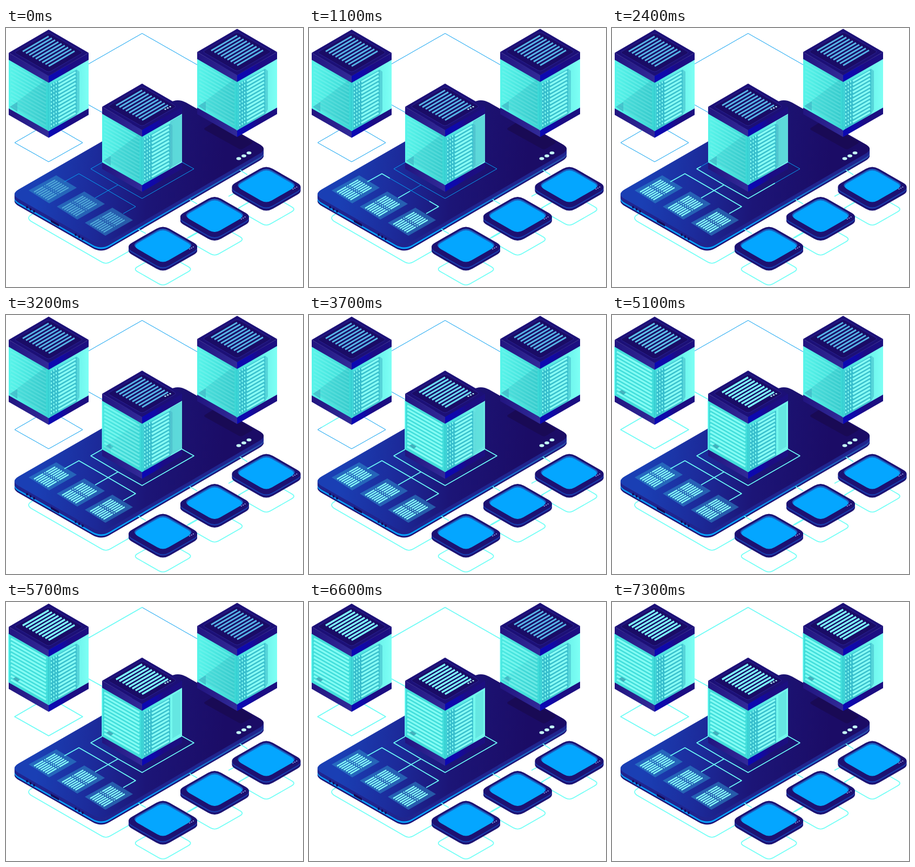
An HTML page for the animation above (9300 ms loop, 550 by 480 pixels).

```html
<!DOCTYPE html>
<html lang="en">
<head>
<meta charset="utf-8">
<title>Isometric servers</title>
<style>
  html, body { margin: 0; width: 100%; height: 100%; overflow: hidden; background: #fff; }
  svg { display: block; width: 550px; height: 480px; }
  .lit { opacity: 0; }
  .dim { fill: none; stroke: #069ff0; stroke-width: 1; }
  .wire { fill: none; stroke: #6ffff6; stroke-width: 1.6; stroke-linejoin: round; }
  .grow { stroke-dasharray: 1 2; stroke-dashoffset: 1; }
</style>
</head>
<body>
<svg id="stage" viewBox="0 0 550 480">
  <defs>
    <linearGradient id="deck" gradientUnits="userSpaceOnUse" x1="60" y1="270" x2="400" y2="300">
      <stop offset="0" stop-color="#1a3fb4"/><stop offset=".3" stop-color="#1c2b9b"/>
      <stop offset=".6" stop-color="#1c1577"/><stop offset="1" stop-color="#1b0c66"/>
    </linearGradient>
    <linearGradient id="edge" gradientUnits="userSpaceOnUse" x1="15" y1="0" x2="477" y2="0">
      <stop offset="0" stop-color="#079cf5"/><stop offset=".45" stop-color="#06a5ff"/>
      <stop offset="1" stop-color="#2a4da8"/>
    </linearGradient>
    <linearGradient id="capL"><stop offset="0" stop-color="#221580"/><stop offset="1" stop-color="#312a98"/></linearGradient>
    <linearGradient id="capR">
      <stop offset="0" stop-color="#0b08b4"/><stop offset=".3" stop-color="#1009a8"/>
      <stop offset=".55" stop-color="#1c0c84"/><stop offset="1" stop-color="#1c1080"/>
    </linearGradient>
    <linearGradient id="glassL"><stop offset="0" stop-color="#58f5ea"/><stop offset="1" stop-color="#3ad6d4"/></linearGradient>
    <linearGradient id="glassR"><stop offset="0" stop-color="#46dcdc"/><stop offset="1" stop-color="#7dfff4"/></linearGradient>
  </defs>
</svg>
<script>
const stage = document.getElementById('stage');
const out = [];
const add = s => out.push(s);
const poly = (pts, fill, extra = '') => add(`<polygon points="${pts}" fill="${fill}" ${extra}/>`);
const path = (d, extra) => add(`<path d="${d}" ${extra}/>`);
const range = (n, f) => Array.from({ length: n }, (_, i) => f(i));

// Closed polygon with corners rounded over r pixels
function round(pts, r) {
  const toward = (p, q) => {
    const k = r / Math.hypot(q[0] - p[0], q[1] - p[1]);
    return [p[0] + (q[0] - p[0]) * k, p[1] + (q[1] - p[1]) * k];
  };
  return pts.map((p, i) => {
    const a = pts[(i + pts.length - 1) % pts.length], b = pts[(i + 1) % pts.length];
    return `${i ? 'L' : 'M'}${toward(p, a)} Q${p} ${toward(p, b)}`;
  }).join(' ') + 'Z';
}
const diamond = (x, y, w, h = w * .577) => [[x - w, y], [x, y - h], [x + w, y], [x, y + h]];

// Stack of shifted copies that forms a slab's side
function slab(d, depth, color) {
  for (let k = depth; k > 0; k--) path(d, `transform="translate(0 ${k})" fill="${color(k)}"`);
}

// Dim wire plus a bright one that grows between two times
const grow = (d, from, to) => {
  path(d, 'class="dim"');
  path(d, `class="wire grow" pathLength="1" data-t="${from},${to}"`);
};
const fade = (from, to) => `class="lit" data-t="${from},${to}"`;

function phone() {
  const d = round([[8, 308], [318, 129.5], [485, 224], [176, 404]], 18);
  slab(d, 13, k => k > 10 ? '#1d1478' : k > 7 ? 'url(#edge)' : '#20258f');
  path(d, 'fill="url(#deck)"');
  path(round([[365, 187], [388, 173], [459, 212], [435, 226]], 5), 'fill="#190a55"');
  [[431, 242], [440.5, 237], [450, 231.5]].forEach(([x, y]) =>
    add(`<ellipse cx="${x}" cy="${y}" rx="4.4" ry="2.7" fill="#c5fff6"/>`));
  poly('83,355 98,363.5 98,368 83,359.5', '#150a58');
  for (const [x, y] of [[39, 332], [129, 383]])
    for (let i = 0; i < 3; i++)
      add(`<ellipse cx="${x + i * 6.5}" cy="${y + i * 3.8}" rx="1.8" ry="2.6" fill="#150a58"/>`);
}

function chip(i) {
  const rows = range(7, k => {
    const x = 52 + k * 4.1, y = 304 + k * 2.4;
    return `M${x} ${y}l17 -9.8m2 -1.2l1.6 -.9m1.6 -.9l17 -9.8`;
  }).join('');
  add(`<g transform="translate(${52 * i} ${30 * i})">`);
  poly('42,301 93,273 131,296 80,325', '#2f8fcb', 'opacity=".55"');
  path(rows, 'fill="none" stroke="#4fa8d8" stroke-width="2.3"');
  path(rows, `fill="none" stroke="#86fff8" stroke-width="2.3" ${fade(100, 1000)}`);
  add('</g>');
}

function cap(y, h) {
  poly(`-74,${y} 0,${y + 42.5} 0,${y + 42.5 + h} -74,${y + h}`, 'url(#capL)');
  poly(`74,${y} 0,${y + 42.5} 0,${y + 42.5 + h} 74,${y + h}`, 'url(#capR)');
}

// Origin is the rear corner of the lid
function server(x, y, body, top, main) {
  const left = range(12, i => `M-70 ${65 + i * 6.9}L-5 ${102 + i * 6.9}`).join('');
  const right = range(12, i => `M18 ${97 + i * 6.9}l32 -18.4`).join('');
  const leds = range(12, i => [5, 9.5, 14].map(c => `M${c} ${104 - c * .57 + i * 6.9}v3.4`).join('')).join('');
  const grille = range(9, i => `M${-48 + i * 6} ${40.5 + i * 3.4}l48 -28`).join('');

  add(`<g transform="translate(${x} ${y})">`);
  cap(145, 13);
  poly('-74,55 0,98 0,188 -74,146', 'url(#glassL)');
  poly('74,55 0,98 0,188 74,146', 'url(#glassR)');

  path(left, 'stroke="#76f4ed" stroke-width="2.6" opacity=".55"');
  poly('-58,133 -5,93 -5,180 -58,149', '#2fa9b4', 'opacity=".24"');
  poly('-72,143 -58,134 -58,152', '#2a8fae', 'opacity=".45"');
  poly('3,102 52,74 52,158 3,186', '#32b6c8', 'opacity=".8"');
  poly('52,74 57,78 57,149 52,158', '#4cc6d0', 'opacity=".7"');
  path(right, 'stroke="#88fff5" stroke-width="3.4"');
  path(leds, 'stroke="#88fff5" stroke-width="2"');

  add(`<g ${fade(...body)}>`);
  poly('-74,55 0,98 0,188 -74,146', '#42dedb');
  path(left, 'stroke="#84fdf4" stroke-width="3.3"');
  poly('-66,139 -61,136 -53,141 -58,145', '#2f94a8', 'opacity=".7"');
  path('M-74 55V146', 'stroke="#66fff5" stroke-width="1.5"');
  add('</g>');

  if (main) {
    poly('52,70 74,57 74,144 52,157', '#4cb9c8', 'opacity=".55"');
    poly('52,70 74,57 74,144 52,157', '#74f8ee', fade(...top));
    poly('56,70 71,61 71,141 56,150', '#5cdcda', 'opacity=".6"');
  }
  path('M0 98V188', 'stroke="#38cfd2" stroke-width="3"');

  cap(43, 13);
  poly('-74,43 0,0 74,43 0,86', '#1c1077');
  path(round(diamond(0, 42.5, 64), 5), 'fill="#1a0c66" stroke="#2b2390"');
  path(grille, 'stroke="#55b4e6" stroke-width="3"');
  path(grille, `stroke="#7dfffa" stroke-width="3.2" ${fade(...top)}`);
  if (main) [43, 47.5, 52].forEach((c, i) =>
    add(`<ellipse cx="${c}" cy="${47.5 - i * 2.3}" rx="1.7" ry="1.2" fill="#b8fff6"/>`));
  add('</g>');
}

function tablet(i) {
  add(`<g transform="translate(${-95.7 * i} ${55.5 * i})">`);
  const d = round(diamond(482, 294, 69.5), 14);
  slab(d, 8, k => k === 3 || k === 4 ? '#1a42b4' : '#1d1474');
  path(d, 'fill="#1c1172"');
  path(round(diamond(482, 291.5, 58), 12), 'fill="#1a5fc0"');
  path(round(diamond(482, 293.2, 56), 12), 'fill="#04a6ff"');
  [0, 1, 2].forEach(k =>
    add(`<ellipse cx="${531.5 + k * 3.4}" cy="${298.6 - k * 1.9}" rx="1.3" ry="1" fill="#8f9be0"/>`));
  add('</g>');
}

// Wires on the floor
grow('M79 176L16 212.5 79 248 142 212.5Z', 3500, 4400);
grow('M190 163L136 133', 3500, 4300);
grow('M140 74L252 10 366 75', 5200, 6200);
const floor = [
  'M50 344L44 348Q39 353 46 358L176 433Q185 439 194 433L236 409',
  'M338 389L366 373M430 334L462 315M412 312L436 299'
];
for (let i = 0; i < 3; i++)
  floor.push(round(diamond(482 - 95.7 * i, 336 + 55.5 * i, 55, 31.5), 9));
path(floor.join(''), 'class="wire"');

phone();
path('M245 373l14 8M340 318l14 8M433 263l14 9', 'class="wire"');
[0, 1, 2].forEach(chip);
grow('M108 285L135 270 187 300', 100, 2000);
grow('M165 315L207 291', 100, 2000);
grow('M217 344L240 331 187 300', 100, 2000);
grow('M207 290.5L157 261 252 207', 2000, 3000);
grow('M207 290.5L252 316 348 261 252 207', 2000, 3000);

server(79, 3, [4400, 5000], [5000, 5600]);
server(428, 1.5, [6200, 7000], [6700, 7300]);
server(252, 103, [3000, 3400], [3400, 4000], true);
[0, 1, 2].forEach(tablet);

stage.insertAdjacentHTML('beforeend', out.join(''));
const parts = [...stage.querySelectorAll('[data-t]')].map(el => {
  const [from, to] = el.dataset.t.split(',').map(Number);
  return { el, from, to, wire: el.classList.contains('grow') };
});

const start = performance.now();
function draw() {
  const t = Math.floor((performance.now() - start) % 9300 / 100) * 100;
  for (const { el, from, to, wire } of parts) {
    const p = Math.min(1, Math.max(0, (t - from) / (to - from)));
    if (wire) {
      el.style.strokeDashoffset = 1 - p;
      el.style.visibility = p ? 'visible' : 'hidden';
    } else el.style.opacity = p;
  }
  requestAnimationFrame(draw);
}
draw();
</script>
</body>
</html>
```
